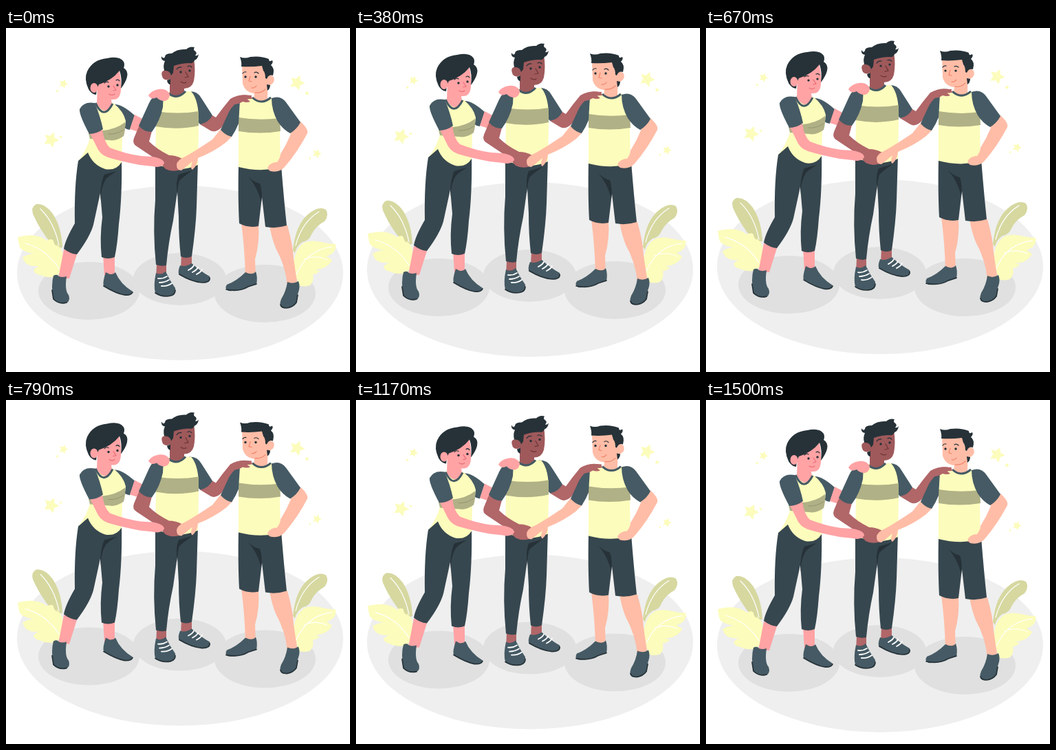
These frames come from a looping animation (500 by 500 pixels, 1540 ms). An HTML page:

```html
<!DOCTYPE html>
<html lang="en">
<head>
<meta charset="utf-8">
<title>Team</title>
<style>
html, body { margin: 0; width: 100%; height: 100%; overflow: hidden; background: #fff; }
svg { display: block; width: 100%; height: 100%; }
.ground { fill: #efefef; }
.shade { fill: #e0e0e0; }
.pale { fill: #fcfcbc; }
.olive { fill: #d6d8a0; }
.band { fill: #b0b186; }
.hair { fill: #263238; }
.slate { fill: #455a64; }
.pants { fill: #37474f; }
.pink { fill: #ffa3a5; }
.umber { fill: #9f595b; }
.brown { fill: #b16668; }
.peach { fill: #ffbda7; }
.line { fill: none; stroke-linecap: round; stroke-linejoin: round; stroke: #263238; stroke-width: 1.2; }
.vein { stroke: #fff; }
.lace { stroke: #fff; stroke-width: 1.8; }
.collar { stroke: #455a64; stroke-width: 3; stroke-linecap: butt; }
.fold { stroke: #8e906b; stroke-width: .8; }
.blush { stroke: #ea6f78; }
.tan { stroke: #f0876c; }
.dusk { stroke: #6d3534; }
.sole { stroke-width: 1.7; }
</style>
</head>
<body>
<svg viewBox="0 0 500 500">
<g id="scene">
  <ellipse class="ground" cx="253" cy="356" rx="237" ry="127"/>
  <g class="shade">
    <ellipse cx="120.5" cy="382" rx="73.5" ry="42"/>
    <ellipse cx="252.5" cy="365" rx="67.5" ry="38"/>
    <ellipse cx="376.5" cy="386" rx="73.5" ry="42"/>
  </g>

  <g id="leaves">
    <path class="olive" d="M82 319Q81 290 68 270Q56 254 44 256Q36 260 39 270Q46 286 55 299Q62 310 73 320Z"/>
    <path class="line vein" d="M50 263Q70 282 77 316"/>
    <path class="pale" d="M17 304Q36 299 48 303Q55 305 59 309Q72 303 75 316Q80 320 82 326L84 346Q78 360 68 362Q58 363 50 359Q42 358 40 352Q44 347 49 346Q31 348 26 338L24 333Q33 328 41 328Q20 325 19 315Z"/>
    <path class="olive" d="M57 304Q70 303 74 309L74 317Q69 314 69 309Q65 305 57 304Z"/>
    <path class="line vein" d="M28 313Q60 322 77 350"/>
    <path class="pale" d="M418 342Q421 318 436 311Q446 308 458 311Q470 314 479 314Q481 325 470 330L466 332L474 337Q470 346 458 350L450 351L456 353Q452 358 446 358Q448 368 442 374Q432 377 426 374Q420 360 418 342Z"/>
    <path class="olive" d="M417 323Q421 285 440 270Q455 258 465 264Q470 272 463 281Q450 288 444 300Q441 309 431 311Q422 317 420 327Z"/>
    <path class="line vein" d="M455 267Q430 282 421 316"/>
    <path class="line vein" d="M422 358Q438 322 474 318M434 336Q450 329 467 337"/>
  </g>

  <g id="stars" class="pale"></g>

  <g id="behind">
    <path class="slate" d="M157 111Q168 110 187 127L180 148Q170 147 160 133Z"/>
    <path class="pink" d="M187 126L202 134L196 152L180 147Z"/>
    <path class="brown" d="M300 127L305 130Q315 116 326 103Q338 96 357 98L356 107Q344 107 339 112Q325 129 313 145Q304 153 297 149L282 140Z"/>
    <path class="slate" d="M266 92Q278 91 284 102L300 127Q294 138 282 140L272 128Z"/>
  </g>

  <g id="middle">
    <path class="brown" d="M219 343H233V365H218ZM255 328H270V350H254Z"/>
    <path class="pants" d="M217 195L217 250Q213 295 218 344Q226 347 233 345Q236 312 243 280L249 237L251 275Q251 305 254 332Q262 336 270 332Q276 290 277 260L279 193Z"/>
    <path class="hair" d="M251 213L271 207Q257 217 252 222Q249 230 249 245Q246 224 251 213Z"/>
    <path class="slate" d="M218 356Q214 374 217 385Q226 392 240 389Q247 386 246 378Q238 367 232 354Q225 360 218 356Z"/>
    <path class="slate" d="M253 345Q249 355 252 359Q270 369 285 370Q297 370 296 361Q283 354 270 342Q260 348 253 345Z"/>
    <path class="line sole" d="M217 385Q227 392 240 389Q246 387 246 381M252 358Q270 369 285 370Q297 370 296 363"/>
    <path class="line lace" d="M221 364Q228 365 234 361M223 370Q231 370 237 366M226 375Q234 376 241 371M265 352Q271 349 273 345M271 355Q277 352 279 348M277 358Q283 355 285 351"/>
    <path class="pale" d="M228 95L238 93Q249 101 260 92L269 92Q281 105 280 140L279 199Q250 212 217 197L218 140Z"/>
    <path class="band" d="M218 121Q250 126 280 121L280 142Q250 149 217 143Z"/>
    <path class="umber" d="M238 48L273 44Q276 62 273 77Q270 88 259 88L259 93Q250 103 238 95L238 76Z"/>
    <path class="umber" d="M239 73Q234 78 228 73Q224 64 229 62Q236 60 240 66Z"/>
    <path class="hair" d="M230 62Q228 54 231 48Q225 47 226 41Q229 46 231 42Q231 37 241 37Q249 30 262 31Q267 26 274 28Q272 31 274 33Q279 36 275 40Q278 41 280 38Q279 45 274 47Q272 52 267 51Q255 51 244 55L243 65L240 69Q238 61 230 62ZM234 76L239 74V82Q235 82 234 76Z"/>
    <circle class="hair" cx="254" cy="64" r="1.7"/><circle class="hair" cx="267" cy="62" r="1.7"/>
    <path class="line" d="M248 60Q251 56 255 57M264 56Q267 54 270 57"/>
    <path class="line dusk" d="M261 64L265 71L260 72M254 78Q258 81 262 79"/>
    <path class="line collar" d="M236 95Q249 105 261 92"/>
    <path class="brown" d="M194 141L186 160Q183 168 190 172L220 192L232 205Q242 210 254 206L256 190Q247 185 237 185Q219 176 208 165L212 150Z"/>
    <path class="slate" d="M229 94Q215 94 208 109L193 142Q200 151 212 151Q224 135 228 115Z"/>
    <path class="pink" d="M207 98Q211 91 222 89Q233 87 238 96Q238 104 231 106Q223 106 219 101Q211 105 207 98Z"/>
  </g>

  <g id="left">
    <path class="pink" d="M84 322L104 326L92 364H76ZM141 330H158L158 360H143Z"/>
    <path class="pants" d="M105 193L119 180L168 190Q169 245 164 285Q162 315 158 333Q148 337 139 333Q136 305 140 275L137 240L127 286Q122 304 103 329Q93 328 84 321Q86 308 100 284Q99 230 105 193Z"/>
    <path class="hair" d="M143 213L161 208Q148 216 145 220Q139 229 137 250Q137 225 143 213Z"/>
    <path class="slate" d="M69 360Q65 374 69 394Q76 402 88 400Q94 396 91 388Q85 382 88 361Q82 363 77 361Q74 357 69 360Z"/>
    <path class="slate" d="M145 355Q140 370 142 375Q160 386 172 388Q183 390 184 383Q166 372 159 355Q157 358 151 358Z"/>
    <path class="line sole" d="M67 381L69 394Q77 402 88 399M142 375Q160 386 172 388Q182 389 184 384"/>
    <path class="pale" d="M128 109L156 109Q171 121 174 135Q173 149 169 160L168 195Q160 208 144 205Q126 199 119 181L105 193Q118 178 124 153Z"/>
    <path class="band" d="M120 153L141 149Q160 147 173 137Q174 147 171 157Q160 165 150 163L122 161Z"/>
    <path class="line fold" d="M149 154Q160 155 171 148"/>
    <path class="pink" d="M133 80L164 60Q168 74 167 90Q166 104 156 104L153 104L154 111Q145 129 132 111Z"/>
    <path class="hair" d="M131 97Q124 96 120 89Q113 74 118 63Q126 46 147 44Q165 40 171 49Q173 53 171 58Q178 62 176 71Q174 79 167 88Q169 72 165 62Q154 76 135 82L132 88Z"/>
    <ellipse class="pink" cx="128" cy="87" rx="5.5" ry="7"/>
    <circle class="hair" cx="149" cy="85" r="1.7"/><circle class="hair" cx="162" cy="83" r="1.7"/>
    <path class="line" d="M143 80Q146 77 149 79M160 76Q163 74 165 77"/>
    <path class="line blush" d="M156 84L160 90L156 91M150 96Q154 99 158 96"/>
    <path class="line collar" d="M130 109Q142 135 155 110"/>
    <path class="pink" d="M122 153L140 148Q143 167 151 174Q174 183 196 186L213 187Q230 190 230 197Q225 204 213 201L194 199Q168 194 148 188Q136 184 131 171Z"/>
    <path class="slate" d="M129 109Q113 106 107 118Q106 126 121 154Q132 154 141 147Q137 128 129 109Z"/>
  </g>

  <g id="right">
    <path class="peach" d="M342 284L367 285Q369 312 362 336L363 362H348Q347 320 342 284ZM383 287L409 287Q417 315 418 335L424 376L409 374Q406 345 392 320Q386 305 383 287Z"/>
    <path class="pants" d="M338 198L400 200Q404 250 408 287Q393 292 377 289L372 246L367 288Q352 291 339 284Q337 250 338 198Z"/>
    <path class="hair" d="M352 216Q360 224 369 226Q373 236 371 253Q365 230 352 216Z"/>
    <path class="slate" d="M348 355Q335 368 321 373Q317 379 323 382Q339 383 352 376L364 373Q366 362 363 354Q358 360 348 355Z"/>
    <path class="slate" d="M409 369Q407 383 400 394Q396 404 402 407Q415 409 422 399Q423 388 425 384Q428 375 425 368Q417 373 409 369Z"/>
    <path class="line sole" d="M320 380Q339 384 352 376L364 372M399 402Q400 407 408 407Q417 406 422 399L424 388"/>
    <path class="pale" d="M338 108L358 101Q371 109 384 101L389 102Q400 122 398 150L399 203Q368 210 338 202Z"/>
    <path class="band" d="M338 130Q368 135 398 131L399 150Q368 155 338 150Z"/>
    <path class="peach" d="M343 52Q362 58 376 52L381 69L380 103Q371 110 360 102L361 95Q348 94 344 81Z"/>
    <path class="peach" d="M378 71Q384 66 389 71Q392 79 384 83Q379 84 377 79Z"/>
    <path class="hair" d="M342 56Q343 50 340 42Q347 45 355 42Q370 40 382 45Q382 50 387 47Q389 50 385 54Q391 58 388 69Q382 67 379 74L377 73Q377 65 374 62L372 55Q357 57 342 56ZM379 82L384 83Q384 88 380 91Z"/>
    <circle class="hair" cx="348" cy="71" r="1.7"/><circle class="hair" cx="363" cy="71" r="1.7"/>
    <path class="line" d="M344 66Q346 63 349 64M361 65Q364 63 367 66"/>
    <path class="line tan" d="M355 70L353 77L357 78M357 87Q361 88 364 84M362 94Q371 95 377 89"/>
    <path class="line collar" d="M358 101Q371 113 385 101"/>
    <path class="peach" d="M312 147L300 162Q278 177 262 186Q248 192 248 199Q248 207 255 207Q264 200 271 194Q267 204 271 206Q278 200 279 189Q302 180 320 166L329 157Z"/>
    <path class="slate" d="M340 106Q331 110 324 122L312 148Q319 156 328 158Q334 149 338 139Z"/>
    <path class="peach" d="M413 152L428 136Q440 147 438 153Q424 180 405 202Q397 211 384 208Q378 204 382 200Q387 195 394 195Q399 188 399 183Q408 169 414 154Z"/>
    <path class="slate" d="M386 102Q399 97 407 108L428 137Q423 147 413 153Q402 147 395 136Q386 120 386 102Z"/>
    <path class="brown" d="M326 104Q338 95 353 98L359 102Q356 104 350 103L355 107Q350 109 344 107Q338 111 331 111Z"/>
  </g>
</g>
</svg>
<script>
const STEP = 1500 / 36, LOOP = 1540, LIFT = 10;
const scene = document.getElementById('scene');

function star(x, y, r, turn) {
  const pts = [];
  for (let i = 0; i < 10; i++) {
    const a = (i * 36 - 90 + turn) * Math.PI / 180;
    const d = i % 2 ? r * 0.5 : r;
    pts.push((x + d * Math.cos(a)).toFixed(1) + ',' + (y + d * Math.sin(a)).toFixed(1));
  }
  return `<polygon points="${pts.join(' ')}"/>`;
}
const dot = (x, y, r) => `<circle cx="${x}" cy="${y}" r="${r}"/>`;

document.getElementById('stars').innerHTML =
  star(423, 79.5, 11.5, 22) + star(83.5, 81, 6.8, 22) +
  star(65.5, 162.5, 11.8, 22) + star(452, 182.5, 6.8, 22) +
  dot(437.5, 95, 2.4) + dot(74.5, 91.5, 1.7) + dot(79.5, 158.5, 1.7) + dot(442, 189.5, 1.4);

// Linear rise and fall, stepped at 24 pictures a second
function draw(ms) {
  const n = Math.min(36, Math.floor((ms % LOOP + 5) / STEP));
  const up = 1 - Math.abs(n / 18 - 1);
  scene.setAttribute('transform', `translate(0 ${(-LIFT * up).toFixed(3)})`);
}

let start;
function tick(now) {
  if (start === undefined) start = now;
  draw(now - start);
  requestAnimationFrame(tick);
}
draw(0);
requestAnimationFrame(tick);
</script>
</body>
</html>
```
